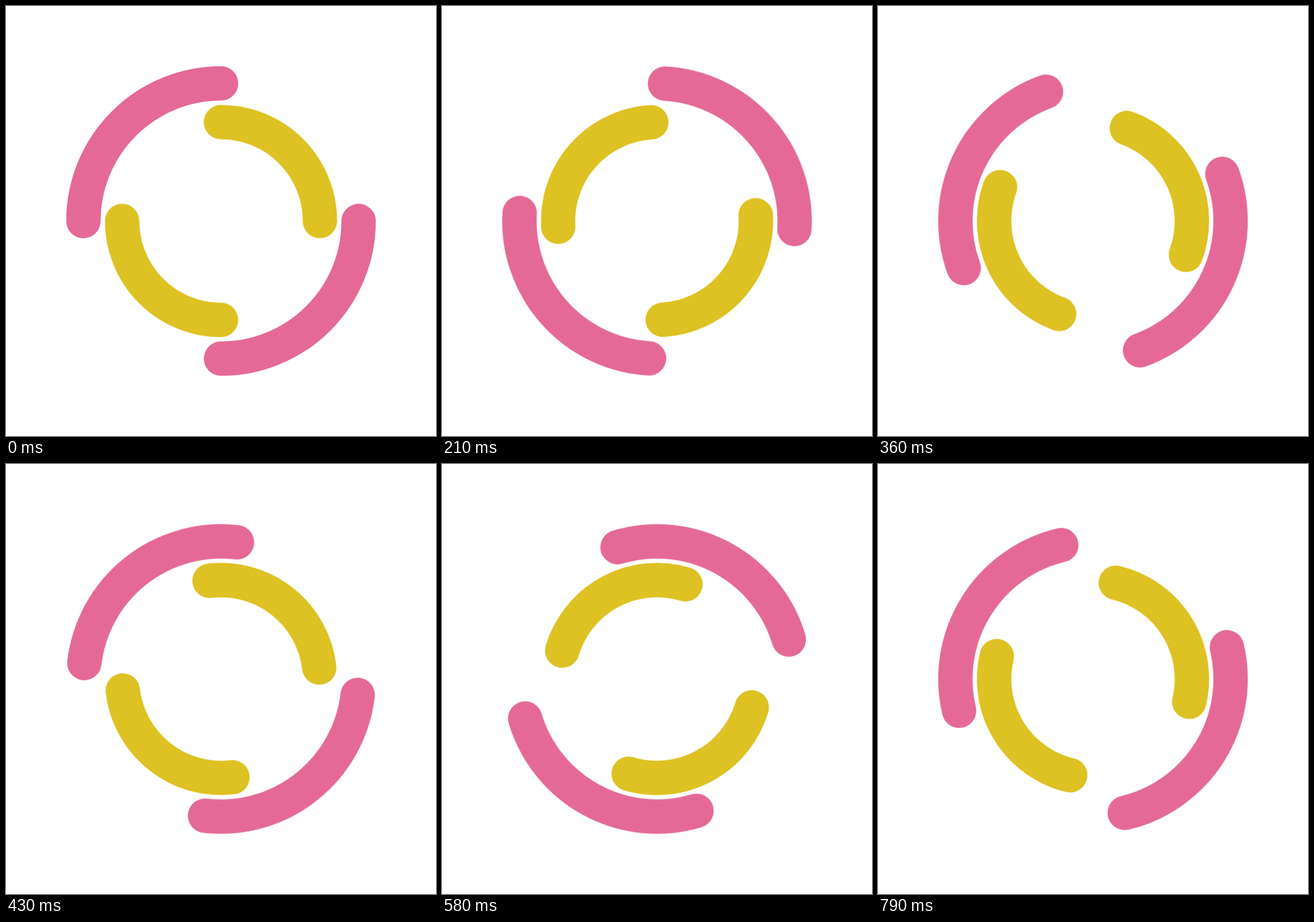
These frames come from a looping animation (748x748 px, 820 ms). An HTML page:

```html
<!DOCTYPE html>
<html lang="en">
<head>
<meta charset="utf-8">
<title>Double ring spinner</title>
<style>
  html, body { margin: 0; width: 100%; height: 100%; overflow: hidden; background: #fff; }
  svg { display: block; width: 100%; height: 100%; }
  path { fill: none; stroke-width: 8; stroke-linecap: round; }
  #outer { stroke: #e56997; }
  #inner { stroke: #dec122; }
</style>
</head>
<body>
<svg viewBox="-50 -50 100 100">
  <path id="outer" d="M-32 0A32 32 0 0 1 0-32M32 0A32 32 0 0 1 0 32"/>
  <path id="inner" d="M0-23A23 23 0 0 1 23 0M0 23A23 23 0 0 1-23 0"/>
</svg>
<script>
  const LOOP = 820, STEPS = 27;

  // Steps last 30 ms each, except the 14th, which lasts 40 ms.
  const table = [
    [0, 0, 'steps(13)'],
    [390, 13, 'steps(1)'],
    [430, 14, 'steps(13)'],
    [LOOP, STEPS, 'linear']
  ];

  function spin(id, dir) {
    const frames = table.map(([ms, step, easing]) => ({
      offset: ms / LOOP,
      transform: `rotate(${dir * step * 360 / STEPS}deg)`,
      easing
    }));
    const anim = document.getElementById(id).animate(frames, { duration: LOOP, iterations: Infinity });
    anim.startTime = 0;
  }

  spin('outer', 1);
  spin('inner', -1);
</script>
</body>
</html>
```
